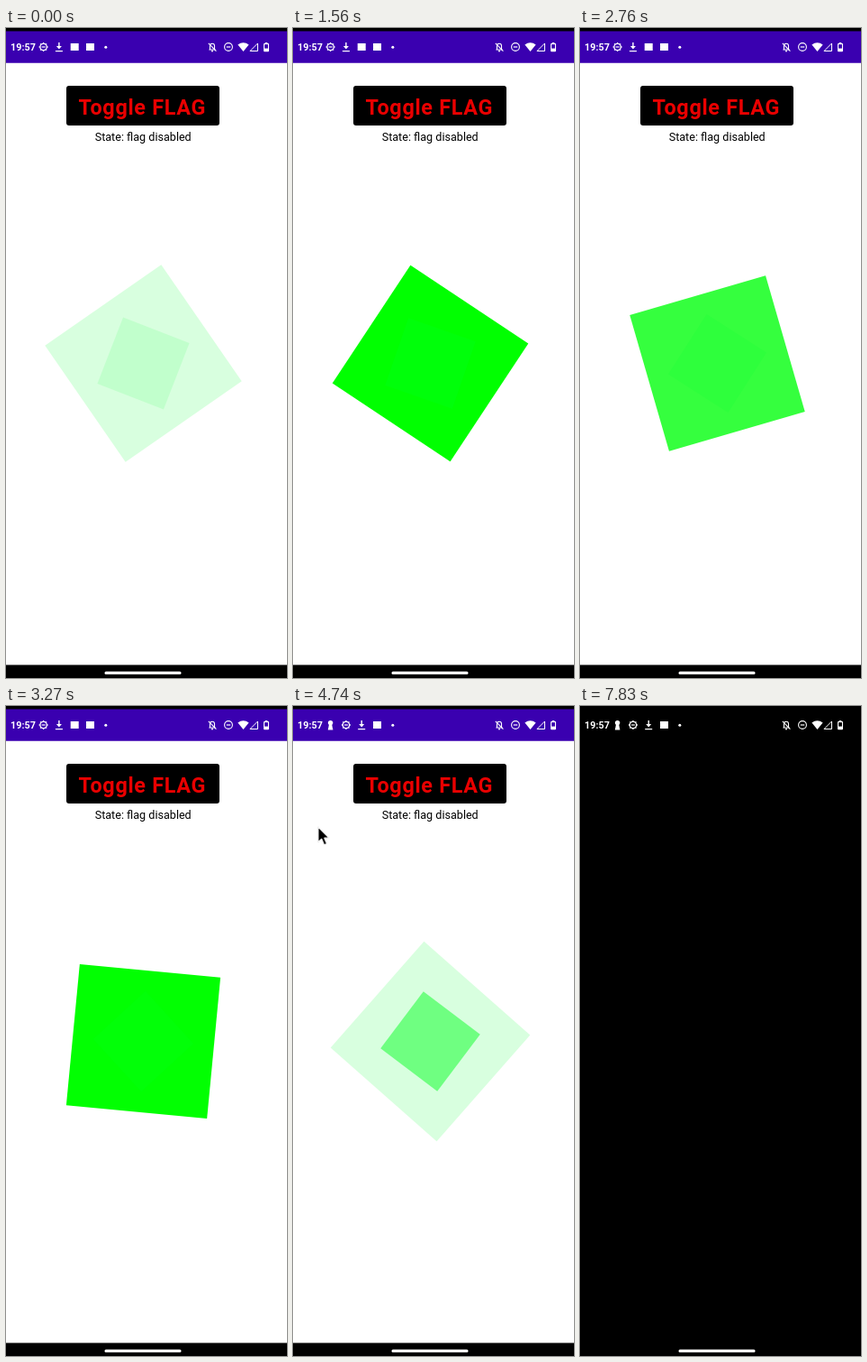
Write an HTML page with a canvas that moves like this. It is 312 px wide and 720 px high and loops after 8 s.

```html
<!DOCTYPE html>
<html lang="en">
<head>
<meta charset="utf-8">
<title>Toggle FLAG</title>
<style>
  html, body { margin: 0; width: 100%; height: 100%; overflow: hidden; background: #000; }
  canvas { display: block; width: 312px; height: 720px; }
</style>
</head>
<body>
<canvas id="stage" width="312" height="720"></canvas>
<script>
const ctx = document.getElementById('stage').getContext('2d');
const LOOP = 8000, STEP = 30;
const SPIN_START = 476, BLACKOUT = 5790, POINTER_IN = 4710, POINTER_OUT = 7830;
const PURPLE = '#3a00b0';

// spin in degrees per ms; the fade is a cosine that is solid at `peak`
const outer = { radius: 111, turn: 44.1, spin: -1.0164, peak: 1551, half: 213.2, low: 0.15 };
const inner = { radius: 55.8, turn: -7.5, spin: 0.9113, peak: 2100, half: 230.4, low: 0.1 };

const legs = [
  { start: POINTER_IN, time: 540, x: 110.5, y: 88 },
  { start: 6660, time: 300, x: 131.5, y: 445 },
  { start: 7080, time: 210, x: 162, y: 717 },
  { start: 7740, time: 90, x: 162, y: 722 }
];

const clamp = v => Math.min(1, Math.max(0, v));
const easeOut = v => 1 - (1 - v) ** 3;

function rect(x, y, w, h, color, r = 0) {
  ctx.fillStyle = color;
  ctx.beginPath();
  ctx.roundRect(x, y, w, h, r);
  ctx.fill();
}

function disc(x, y, r) {
  ctx.fillStyle = '#fff';
  ctx.beginPath();
  ctx.arc(x, y, r, 0, Math.PI * 2);
  ctx.fill();
}

function ring(x, y, r, w) {
  ctx.strokeStyle = '#fff';
  ctx.lineWidth = w;
  ctx.beginPath();
  ctx.arc(x, y, r, 0, Math.PI * 2);
  ctx.stroke();
}

function poly(points, color = '#fff') {
  ctx.fillStyle = color;
  ctx.beginPath();
  points.forEach(p => ctx.lineTo(p[0], p[1]));
  ctx.closePath();
  ctx.fill();
}

function line(x1, y1, x2, y2, w = 1.2) {
  ctx.strokeStyle = '#fff';
  ctx.lineWidth = w;
  ctx.beginPath();
  ctx.moveTo(x1, y1);
  ctx.lineTo(x2, y2);
  ctx.stroke();
}

function text(str, x, y, font, color, align = 'left', spacing = 0) {
  ctx.font = font + ' Roboto, sans-serif';
  ctx.fillStyle = color;
  ctx.textAlign = align;
  ctx.letterSpacing = spacing + 'px';
  ctx.fillText(str, x, y);
  ctx.letterSpacing = '0px';
}

const icons = {
  gear(x) {
    ring(x, 21, 3.7, 1.3);
    for (let i = 0; i < 8; i++) {
      const c = Math.cos(i * Math.PI / 4), s = Math.sin(i * Math.PI / 4);
      line(x + c * 3.8, 21 + s * 3.8, x + c * 5, 21 + s * 5, 1.3);
    }
    line(x - 2, 21, x + 2, 21, 1.2);
  },
  down(x) {
    line(x, 16, x, 21, 1.4);
    poly([[x - 3, 20], [x + 3, 20], [x, 23.4]]);
    line(x - 4, 25.6, x + 4, 25.6);
  },
  mail(x) { rect(x - 4.5, 17, 9, 8, '#fff'); },
  smallMail(x) { rect(x - 3, 18.5, 6, 5, '#fff'); },
  key(x) {
    disc(x, 18.6, 2.7);
    poly([[x - 1.5, 20], [x + 1.5, 20], [x + 2.8, 26.5], [x - 2.8, 26.5]]);
  },
  dot(x) { disc(x, 21.2, 1.5); }
};

function notifications(t) {
  if (t >= 4200) return ['key', 'gear', 'down', 'mail', 'dot'];
  if (t >= 2040 && t < 2190) return ['gear', 'mail', 'mail', '', 'smallMail'];
  return ['gear', 'down', 'mail', 'mail', 'dot'];
}

function statusBar(t, back) {
  text('19:57', 5, 25, '600 10.8px', '#fff');
  notifications(t).forEach((name, i) => name && icons[name](41.6 + i * 17.3));

  // muted bell
  ctx.strokeStyle = '#fff';
  ctx.lineWidth = 1.1;
  ctx.beginPath();
  ctx.moveTo(225.4, 24);
  ctx.lineTo(232.6, 24);
  ctx.moveTo(226.5, 24);
  ctx.arc(229, 19.8, 2.5, Math.PI, 0);
  ctx.lineTo(231.5, 24);
  ctx.stroke();
  disc(229, 25.4, 1);
  line(224.8, 16.8, 233.4, 25.6, 1.1);

  // do not disturb
  ring(247, 21, 4.4, 1.1);
  line(244.8, 21, 249.2, 21);

  // wifi, signal, battery
  ctx.fillStyle = '#fff';
  ctx.beginPath();
  ctx.moveTo(263.5, 26);
  ctx.lineTo(257.4, 18.6);
  ctx.quadraticCurveTo(263.5, 13.8, 269.6, 18.6);
  ctx.fill();
  ctx.lineWidth = 1;
  ctx.beginPath();
  ctx.moveTo(279.5, 17);
  ctx.lineTo(279.5, 25.5);
  ctx.lineTo(271, 25.5);
  ctx.closePath();
  ctx.stroke();
  rect(287.7, 16, 2.6, 2, '#fff');
  rect(286, 17, 6, 9.2, '#fff', 1);
  rect(287.1, 18.2, 3.8, 4.4, back);
}

function square(s, t) {
  const wave = 0.5 + 0.5 * Math.cos(Math.PI * (t - s.peak) / s.half);
  const alpha = s.low + (1 - s.low) * wave;
  const r = s.radius;
  ctx.save();
  ctx.translate(152.5, 371.5);
  ctx.rotate((s.turn + s.spin * t) * Math.PI / 180);
  ctx.globalAlpha = alpha;
  poly([[0, -r], [r, 0], [0, r], [-r, 0]], `rgb(0, 255, ${Math.round(60 * (1 - alpha))})`);
  ctx.restore();
}

function app(t) {
  rect(0, 3.6, 312, 36, PURPLE);
  rect(0, 38.7, 312, 666.8, '#fff');
  rect(67, 64, 170, 44, '#000', 3);
  text('Toggle FLAG', 80.6, 95.6, '600 23.4px', '#e90000', 'left', 0.7);
  text('State: flag disabled', 152.2, 125.4, '400 12.6px', '#000', 'center');
  const spinTime = Math.max(t, SPIN_START);
  square(outer, spinTime);
  square(inner, spinTime);
}

function cursor(t) {
  if (t <= POINTER_IN || t >= POINTER_OUT) return;
  let x = 12.5, y = 142.6;
  for (const leg of legs) {
    const k = easeOut(clamp((t - leg.start) / leg.time));
    x += (leg.x - x) * k;
    y += (leg.y - y) * k;
  }
  ctx.save();
  ctx.translate(x, y);
  poly([[0, 0], [0, 16.8], [3.8, 13.3], [6.6, 19.8], [9.6, 18.5], [6.9, 12.2], [12, 12]], '#000');
  ctx.strokeStyle = '#f0f0f0';
  ctx.lineWidth = 1.2;
  ctx.lineJoin = 'round';
  ctx.stroke();
  ctx.restore();
}

function draw(now) {
  const t = Math.floor((now % LOOP) / STEP) * STEP;
  const dark = t >= BLACKOUT;
  rect(0, 0, 312, 720, '#000');
  if (!dark) app(t);
  statusBar(t, dark ? '#000' : PURPLE);
  rect(109.5, 712.8, 85, 3.2, '#fff', 1.5);
  cursor(t);
}

const start = performance.now();
function tick() {
  draw(performance.now() - start);
  requestAnimationFrame(tick);
}
tick();
</script>
</body>
</html>
```
